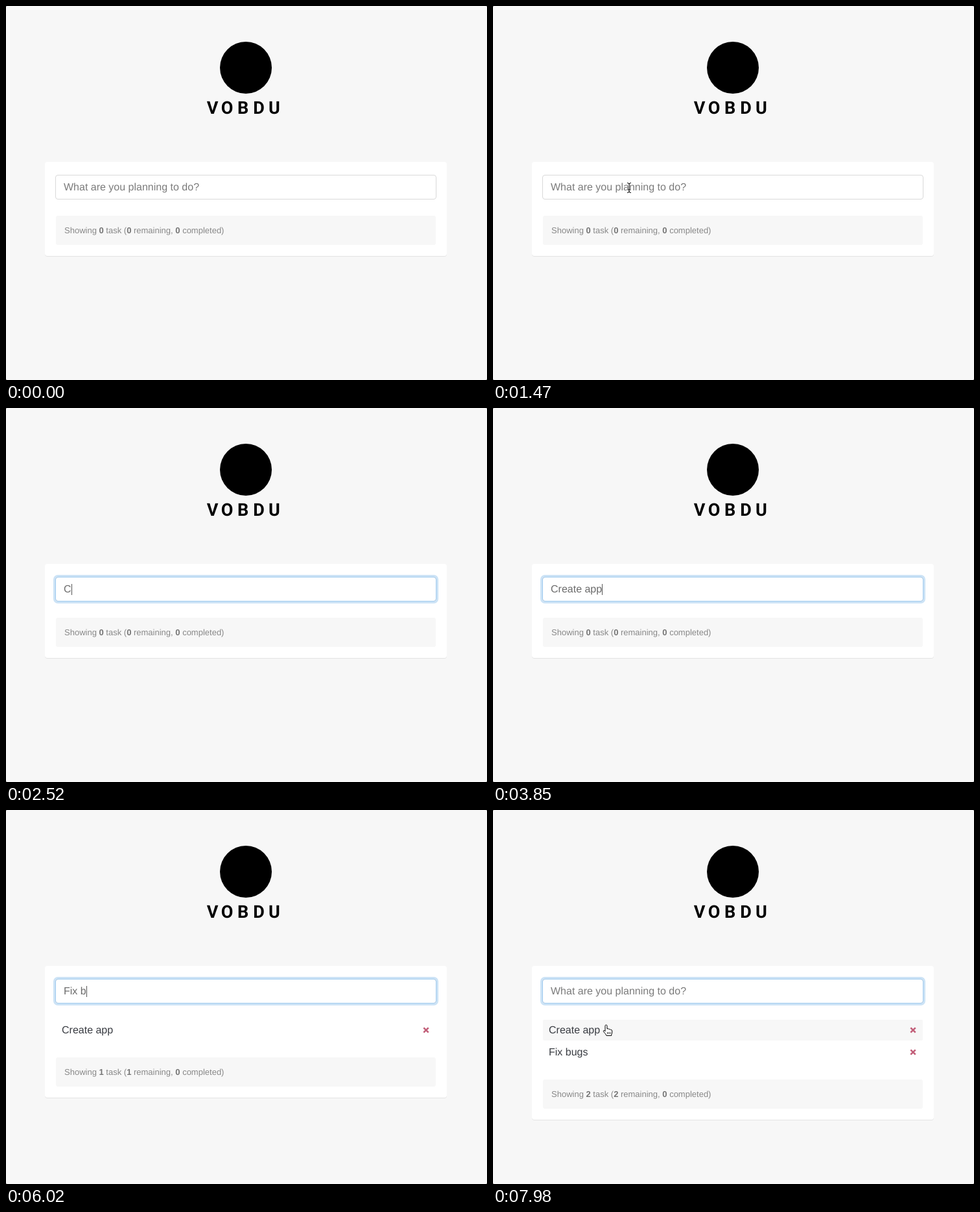
Recreate the animation shown at these times as an HTML page. Size 742 px wide and 576 px high, loop 8000 ms.

```html
<!DOCTYPE html>
<html lang="en">
<head>
<meta charset="utf-8">
<title>To-do list</title>
<style>
html, body { margin: 0; height: 100%; overflow: hidden; background: #777; }
svg { display: block; width: 742px; height: 576px; }
text { font: 16px "Liberation Sans", Arial, sans-serif; white-space: pre; text-rendering: geometricPrecision; }
#brand { font: 700 27px Roboto, sans-serif; text-anchor: middle; }
#card { filter: drop-shadow(0 1.5px .4px rgba(0, 0, 0, .08)); }
.item text { fill: #393c42; }
.item path { stroke: #c3607a; stroke-width: 2.6; }
#footer text { font-size: 13px; fill: #888; }
#footer tspan { font-weight: bold; fill: #757575; }
</style>
</head>
<body>
<svg viewBox="0 0 742 576">
  <rect width="742" height="576" rx="2" fill="#f7f7f7"/>
  <circle cx="370" cy="95" r="40"/>
  <text id="brand" x="318.5 341 365.5 390 414" y="165.5">VOBDU</text>

  <rect id="card" x="60" y="240" width="620" rx="4" fill="#fff"/>
  <rect x="76.5" y="260.5" width="587" height="37" rx="3.5" fill="#fff" stroke="#d9d9d9"/>
  <g id="glow" fill="none">
    <rect x="74.5" y="258.5" width="591" height="41" rx="5.5" stroke="#cce3f6" stroke-width="3"/>
    <rect x="76.5" y="260.5" width="587" height="37" rx="3.5" stroke="#a1cbef"/>
  </g>
  <text id="field" x="89" y="284"></text>
  <rect id="caret" y="271" width="1" height="17" fill="#555"/>

  <rect id="hover" x="77" y="323" width="586" height="32" rx="2" fill="#f7f7f7"/>
  <g class="item"><text x="86" y="344">Create app</text><path d="M644.3 335.3l7.4 7.4m0-7.4l-7.4 7.4"/></g>
  <g class="item" transform="translate(0 34)"><text x="86" y="344">Fix bugs</text><path d="M644.3 335.3l7.4 7.4m0-7.4l-7.4 7.4"/></g>

  <g id="footer">
    <rect x="77" width="586" height="45" rx="3" fill="#f7f7f7"/>
    <text x="90" y="27">Showing <tspan class="count">0</tspan> task (<tspan class="count">0</tspan> remaining, <tspan>0</tspan> completed)</text>
  </g>

  <g id="cursor" stroke-linejoin="round">
    <path id="arrow" d="M0 0V15.5L3.6 12.2L6 18L8.6 16.9L6.2 11.3H11Z" stroke="#fff"/>
    <g id="beam" fill="none">
      <path d="M-3-7.5Q0-7.5 0-5.5V5.5Q0 7.5-3 7.5M3-7.5Q0-7.5 0-5.5M0 5.5Q0 7.5 3 7.5M-2 3H2" stroke="#fff" stroke-width="2.2" opacity=".7"/>
      <path d="M-3-7.5Q0-7.5 0-5.5V5.5Q0 7.5-3 7.5M3-7.5Q0-7.5 0-5.5M0 5.5Q0 7.5 3 7.5M-2 3H2" stroke="#000"/>
    </g>
    <g id="hand" transform="translate(-6 -1)" fill="#fff" stroke="#000">
      <path d="M5 10V2.5a1.5 1.5 0 0 1 3 0V7q2.5-1 3 .8q2-.8 2.5.8q2-.5 2.2 1.2V12q0 2-1 4V17.5H7q-1-3-4.5-6q-.8-1.5.5-2q1 0 2 1.5Z"/>
      <path d="M8.5 12v3M10.7 12v3M12.9 12v3" stroke-width=".8"/>
    </g>
  </g>
</svg>
<script>
const LOOP = 8000, STEP = 70;
const $ = id => document.getElementById(id);
const items = document.querySelectorAll('.item');
const counts = document.querySelectorAll('.count');

const entries = [
  { text: 'Create app', keys: [2520, 2730, 2870, 3080, 3220, 3290, 3500, 3570, 3710, 3850], added: 4130 },
  { text: 'Fix bugs', keys: [5110, 5320, 5460, 5670, 5880, 6090, 6300, 6510], added: 7140 }
];
const caretOff = [[0, 1540], [2310, 2520], [4620, 5110], [7000, 7140], [7630, LOOP]];
// start, end, from x, y, to x, y
const moves = [
  [70, 630, 370, 458, 215, 293],
  [910, 1190, 215, 293, 210, 280],
  [7700, 7980, 210, 280, 174, 331]
];

const clamp = v => Math.max(0, Math.min(1, v));
const ease = p => p * p * (3 - 2 * p);
const show = (id, on) => $(id).style.display = on ? '' : 'none';

function drawCursor(t) {
  const [start, end, x0, y0, x1, y1] = moves.filter(m => t >= m[0]).pop() || moves[0];
  const p = ease(clamp((t - start) / (end - start)));
  const x = x0 + (x1 - x0) * p, y = y0 + (y1 - y0) * p;
  const overField = y > 260 && y < 298;
  const overItem = t >= 7700 && y >= 323;
  show('cursor', t >= 70 && t < 2520 || t >= 7700);
  show('beam', overField);
  show('hand', overItem);
  show('arrow', !overField && !overItem);
  show('hover', overItem);
  $('cursor').setAttribute('transform', `translate(${x} ${y})`);
}

function drawField(t) {
  const entry = entries.find(e => t >= e.keys[0] && t < e.added);
  const typed = entry ? entry.text.slice(0, entry.keys.filter(k => t >= k).length) : '';
  const field = $('field');
  field.textContent = typed || 'What are you planning to do?';
  field.style.fill = typed ? '#6b6b6b' : '#7b7b7b';
  $('caret').setAttribute('x', Math.round(89 + (typed ? field.getComputedTextLength() : 0)));
  show('caret', !caretOff.some(([a, b]) => t >= a && t < b));
  $('glow').style.opacity = clamp((t - 1470) / 210);
}

function drawList(t) {
  const n = entries.filter(e => t >= e.added).length;
  const top = n ? 347 + 34 * n : 323;
  entries.forEach((e, i) => items[i].style.opacity = t < e.added ? 0 : clamp((t - e.added + STEP) / 140));
  counts.forEach(c => c.textContent = n);
  $('footer').setAttribute('transform', `translate(0 ${top})`);
  $('card').setAttribute('height', top + 62 - 240);
}

function frame(now) {
  const t = Math.floor(now % LOOP / STEP) * STEP;
  drawField(t);
  drawList(t);
  drawCursor(t);
  requestAnimationFrame(frame);
}
frame(0);
</script>
</body>
</html>
```
